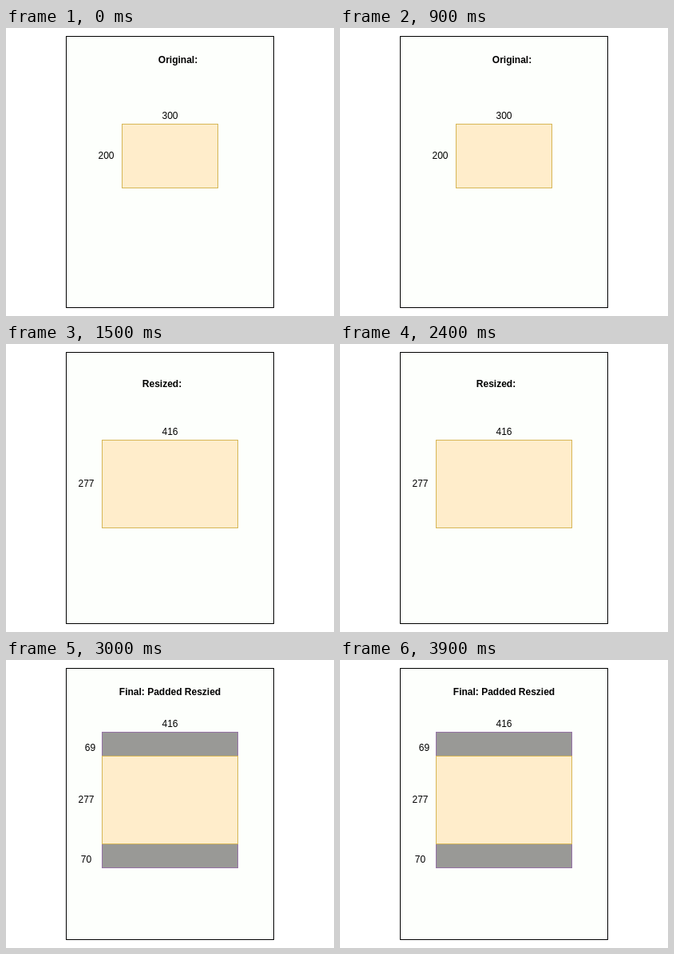
These frames come from a looping animation (411x361 px, 4500 ms). An HTML page:

```html
<!DOCTYPE html>
<html lang="en">
<head>
<meta charset="utf-8">
<title>Resize and pad</title>
<style>
  html, body { margin: 0; width: 100%; height: 100%; overflow: hidden; background: #fff; }
  svg { display: block; }
  text { font: 12px "Liberation Sans", Arial, Helvetica, sans-serif; text-anchor: middle; fill: #000; }
  .title { font-weight: bold; }
  .page { fill: #fdfffc; stroke: #000; }
  .image { fill: #ffedcb; stroke: #d6b656; }
  .pad { fill: #999996; stroke: #9673a6; }
</style>
</head>
<body>
<svg width="411" height="361" viewBox="0 0 411 361">
  <rect class="page" x="75.5" y="10.5" width="260" height="340"/>
  <g id="scene"></g>
</svg>
<script>
const STEP = 1500;
const scene = document.getElementById('scene');

const box = (cls, x, y, w, h) =>
  `<rect class="${cls}" x="${x + 0.5}" y="${y + 0.5}" width="${w}" height="${h}"/>`;
// Labels are centred on (x, y).
const label = (text, x, y, cls = '') =>
  `<text class="${cls}" x="${x + 0.5}" y="${y + 4}">${text}</text>`;

const steps = [
  box('image', 145, 120, 120, 80) +
  label('Original:', 215, 40, 'title') +
  label('300', 205, 110) +
  label('200', 125, 160),

  box('image', 120, 120, 170, 110) +
  label('Resized:', 195, 50, 'title') +
  label('416', 205, 110) +
  label('277', 100, 175),

  box('pad', 120, 90, 170, 170) +
  box('image', 120, 120, 170, 110) +
  label('Final: Padded Reszied', 205, 40, 'title') +
  label('416', 205, 80) +
  label('69', 105, 110) +
  label('277', 100, 175) +
  label('70', 100, 250)
];

let shown = -1;
function render(time) {
  const step = Math.floor(time / STEP) % steps.length;
  if (step === shown) return;
  shown = step;
  scene.innerHTML = steps[step];
}

const start = performance.now();
function tick() {
  render(performance.now() - start);
  requestAnimationFrame(tick);
}
tick();
</script>
</body>
</html>
```
